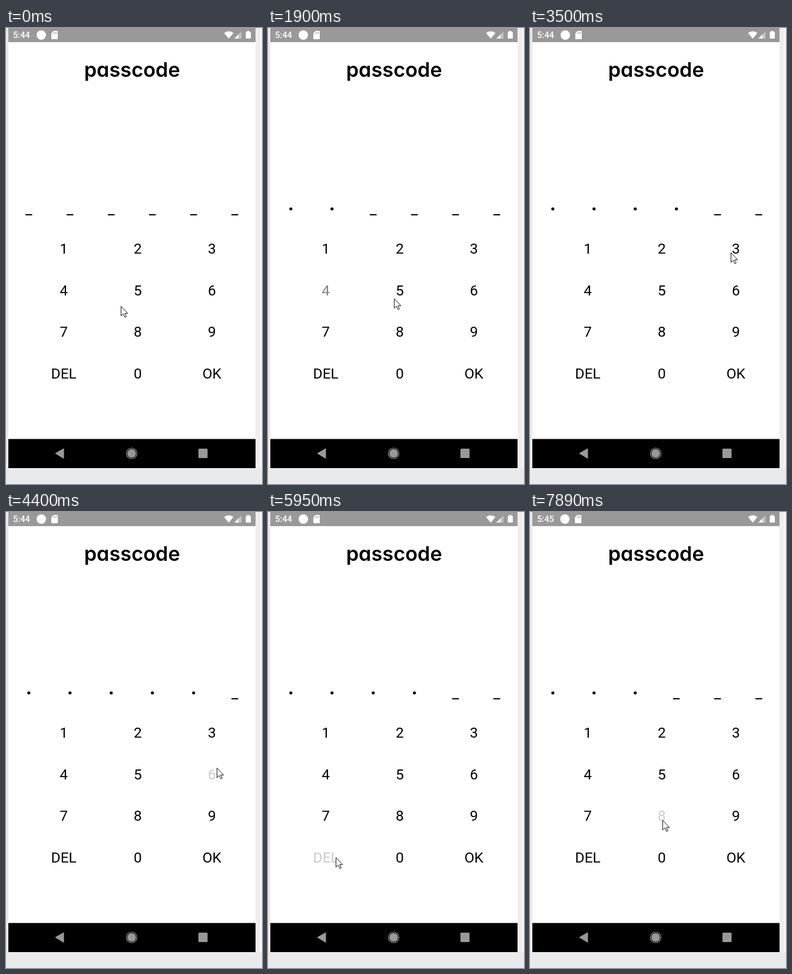
Recreate the animation shown at these times as an HTML page. Size 435 by 774 pixels, loop 7.99 s.

```html
<!DOCTYPE html>
<html lang="en">
<head>
<meta charset="utf-8">
<title>Passcode</title>
<style>
  html, body { margin: 0; width: 100%; height: 100%; overflow: hidden; background: #e9eaec; }
  svg { display: block; width: 435px; height: 774px; }
  text { font-family: Roboto, sans-serif; }
  .title { font: 600 34.3px Inter, "Open Sans", sans-serif; font-feature-settings: "cv11"; text-anchor: middle; }
  .clock { font-size: 14.7px; font-weight: 500; fill: #fff; }
  .key { font-size: 24.5px; text-anchor: middle; }
</style>
</head>
<body>
<svg viewBox="0 0 435 774">
  <rect width="435" height="774" fill="#e9eaec"/>
  <rect x="424" width="11" height="747" fill="#eeeeef"/>
  <rect x="431" width="4" height="747" fill="#f4f4f4"/>
  <rect x="4" width="420" height="698" fill="#fff"/>
  <rect x="4" width="420" height="24" fill="#999"/>
  <rect x="4" y="697.6" width="420" height="49.400"/>

  <text class="clock" id="clock" x="12" y="17">5:44</text>
  <g id="icons" fill="#fff">
    <circle cx="60" cy="12" r="8"/>
    <path d="M81 5h6q1 0 1 1v12q0 1-1 1h-9q-1 0-1-1V9z"/>
    <path d="M81.5 7v3M83.7 7v3M85.9 7v3" stroke="#999"/>
  </g>
  <path d="M370.500 8.500Q378.500 2.500 386.500 8.500L378.500 18z" fill="#fff"/>
  <path d="M400 6v12h-12z" fill="#c4c4c4"/>
  <path d="M395 11v7h-7z" fill="#fff"/>
  <path d="M409.500 5h4v1.500h1.500q1 0 1 1V17q0 1-1 1h-6.500q-1 0-1-1V7.500q0-1 1-1h1z" fill="#fff"/>

  <text class="title" x="214.200" y="83">passcode</text>
  <g id="slots"></g>
  <g id="keys"></g>

  <g fill="#999">
    <path d="M84 722L98 714V730.500z" stroke="#999" stroke-linejoin="round"/>
    <circle cx="213.500" cy="722" r="7.300"/>
    <circle cx="213.500" cy="722" r="9" fill="none" stroke="#999" stroke-width="1.200"/>
    <rect x="327" y="714" width="15.500" height="16" rx="1.500"/>
  </g>
  <path id="cursor" d="M.5.5v16.300l3.800-3.600 2.700 5.800 2.400-1.100-2.600-5.500h5z" fill="#fff" stroke="#111" stroke-linejoin="round"/>
</svg>
<script>
const LOOP = 7990, REFRESH = 50;
const LAG = 130;    // the screen answers this long after the pointer acts
const FADE = 250, DIMMED = 0.2;
const $ = id => document.getElementById(id);
const smooth = k => k * k * (3 - 2 * k);
const clamp = k => Math.min(1, Math.max(0, k));

function add(parent, tag, attrs, text = '') {
  const node = document.createElementNS('http://www.w3.org/2000/svg', tag);
  for (const name in attrs) node.setAttribute(name, attrs[name]);
  node.textContent = text;
  return parent.appendChild(node);
}

const slots = Array.from({ length: 6 }, (_, i) => ({
  dash: add($('slots'), 'rect', { x: 33 + 70 * i, y: 316, width: 11.5, height: 2 }),
  dot: add($('slots'), 'circle', { cx: 38.8 + 70 * i, cy: 307, r: 2.6 })
}));

const keys = {};
'1 2 3 4 5 6 7 8 9 DEL 0 OK'.split(' ').forEach((label, i) => {
  const x = 98.2 + 125.8 * (i % 3), y = Math.round(383.4 + 70.4 * Math.floor(i / 3));
  keys[label] = add($('keys'), 'text', { class: 'key', x, y }, label);
});

// Where the pointer rests, and the key it taps there before leaving
const stops = [
  { x: 195, y: 472, from: 0, to: 50 },
  { x: 56, y: 417, from: 600, to: 650 },
  { x: 96, y: 449, from: 950, to: 1670, key: '4', taps: 2, beat: 500 },
  { x: 214, y: 459, from: 1890, to: 2420, key: '5' },
  { x: 225, y: 384, from: 2740, to: 2970, key: '2' },
  { x: 341, y: 381, from: 3350, to: 3650, key: '3' },
  { x: 358, y: 434, from: 4150, to: 4540, key: '6', hold: 280 },
  { x: 115, y: 586, from: 4950, to: 6450, key: 'DEL', taps: 6, beat: 170 },
  { x: 225, y: 523, from: 6750, to: 7830, key: '8', taps: 4, beat: 340 }
];

const presses = stops.filter(s => s.key).flatMap(({ key, to, taps = 1, beat = 0, hold = 120 }) =>
  Array.from({ length: taps }, (_, i) => {
    const up = to + LAG - beat * (taps - 1 - i);
    return { key, down: up - hold, up };
  }));

function pointerAt(t) {
  const i = stops.findLastIndex(s => s.from <= t);
  const a = stops[i], b = stops[i + 1] ?? a;
  const k = a === b ? 0 : smooth(clamp((t - a.to) / (b.from - a.to)));
  return [a.x + (b.x - a.x) * k, a.y + (b.y - a.y) * k].map(Math.round);
}

function draw(time) {
  const t = Math.floor(time / REFRESH) * REFRESH;
  const opacity = {};
  let count = 0;
  for (const { key, down, up } of presses) {
    if (t >= down) opacity[key] = DIMMED + (1 - DIMMED) * smooth(clamp((t - up) / FADE));
    if (t >= up) count += key === 'DEL' ? -1 : 1;
  }
  for (const key in keys) keys[key].setAttribute('opacity', opacity[key] ?? 1);
  slots.forEach(({ dash, dot }, i) => {
    dash.setAttribute('visibility', i < count ? 'hidden' : 'visible');
    dot.setAttribute('visibility', i < count ? 'visible' : 'hidden');
  });
  const nextMinute = t >= 6850;
  $('clock').textContent = nextMinute ? '5:45' : '5:44';
  $('icons').setAttribute('transform', `translate(${nextMinute ? -0.7 : 0} 0)`);
  $('cursor').setAttribute('transform', `translate(${pointerAt(t)})`);
}

const start = performance.now();
function tick() {
  draw((performance.now() - start) % LOOP);
  requestAnimationFrame(tick);
}
tick();
</script>
</body>
</html>
```
